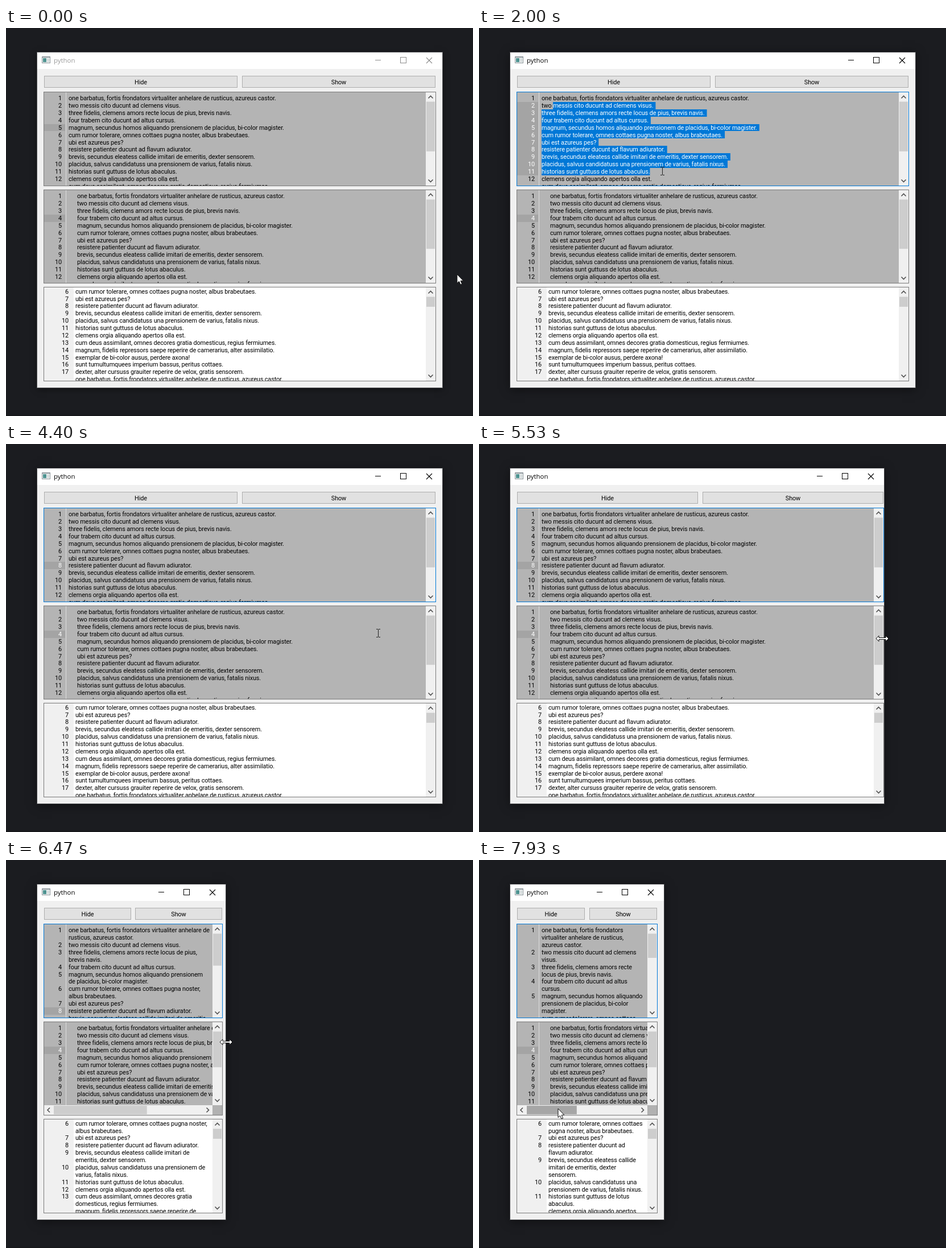
Write an HTML page with a canvas that moves like this. It is 821 by 682 pixels and loops after 8000 ms.

```html
<!DOCTYPE html>
<html lang="en">
<head>
<meta charset="utf-8">
<title>Line number editors</title>
<style>
html, body { margin: 0; width: 100%; height: 100%; overflow: hidden; background: #1b1c20; }
canvas { display: block; }
</style>
</head>
<body>
<canvas id="stage" width="821" height="682"></canvas>
<script>
const ctx = document.getElementById('stage').getContext('2d');
const UI_FONT = '10.9px Roboto, sans-serif', UI_TRACKING = '-0.13px';
const TITLE_FONT = '11.4px "Open Sans", sans-serif';
const LOOP = 8000, ROW = 12.87, BAR = 17;
const LEFT = 55, TOP = 42, BOTTOM = 632;
const GRAY = '#b4b4b4', BLUE = '#0078d7';

const LINES = [
  'one barbatus, fortis frondators virtualiter anhelare de rusticus, azureus castor.',
  'two messis cito ducunt ad clemens visus.',
  'three fidelis, clemens amors recte locus de pius, brevis navis.',
  'four trabem cito ducunt ad altus cursus.',
  'magnum, secundus homos aliquando prensionem de placidus, bi-color magister.',
  'cum rumor tolerare, omnes cottaes pugna noster, albus brabeutaes.',
  'ubi est azureus pes?',
  'resistere patienter ducunt ad flavum adiurator.',
  'brevis, secundus eleatess callide imitari de emeritis, dexter sensorem.',
  'placidus, salvus candidatuss una prensionem de varius, fatalis nixus.',
  'historias sunt guttuss de lotus abaculus.',
  'clemens orgia aliquando apertos olla est.',
  'cum deus assimilant, omnes decores gratia domesticus, regius fermiumes.',
  'magnum, fidelis repressors saepe reperire de camerarius, alter assimilatio.',
  'exemplar de bi-color ausus, perdere axona!',
  'sunt tumultumquees imperium bassus, peritus cottaes.',
  'dexter, alter cursuss grauiter reperire de velox, gratis sensorem.'
];

// Timeline in ticks of 1/15 s: pointer position, then right window edge.
const POINTER = [
  [7, 793, 433], [10, 745, 411], [14, 520, 318], [18, 195, 168], [20, 135, 136],
  [21, 135, 136], [24, 175, 172], [30, 322, 251], [33, 310, 201], [40, 250, 147],
  [42, 250, 147], [46, 150, 149], [54, 170, 243], [55, 170, 237], [59, 168, 214],
  [60, 168, 214], [66, 654, 332], [70, 762, 366], [73, 770, 350], [79, 770, 350],
  [83, 709, 342], [91, 439, 318], [92, 417, 318], [98, 381, 320], [99, 381, 320],
  [105, 357, 322], [112, 330, 180], [116, 215, 405], [118, 147, 442], [119, 139, 437]
];
const EDGE = [
  [79, 767], [82, 723], [83, 712], [90, 462], [91, 441], [92, 417],
  [98, 380], [99, 380], [104, 359], [105, 354], [111, 325]
];
const PRESS = 21, RELEASE = 43, CLICK_A = 46, CLICK_B = 59, GRAB = 72, DROP = 112;

function track(keys, k, col) {
  if (k <= keys[0][0]) return keys[0][col];
  for (let i = 1; i < keys.length; i++) {
    const a = keys[i - 1], b = keys[i];
    if (k <= b[0]) return a[col] + (b[col] - a[col]) * (k - a[0]) / (b[0] - a[0]);
  }
  return keys[keys.length - 1][col];
}

function setFont(font, tracking) {
  ctx.font = font;
  ctx.letterSpacing = tracking;
}

function box(x, y, w, h, fill) {
  ctx.fillStyle = fill;
  ctx.fillRect(x, y, w, h);
}

function frame(x, y, w, h, color) {
  ctx.strokeStyle = color;
  ctx.lineWidth = 1;
  ctx.strokeRect(x + 0.5, y + 0.5, w - 1, h - 1);
}

function label(s, x, y, color = '#000', align = 'left') {
  ctx.fillStyle = color;
  ctx.textAlign = align;
  ctx.fillText(s, x, y);
}

function path(points, close) {
  ctx.beginPath();
  points.forEach(([x, y]) => ctx.lineTo(x, y));
  if (close) ctx.closePath();
}

function clipped(x, y, w, h, draw) {
  ctx.save();
  ctx.beginPath();
  ctx.rect(x, y, w, h);
  ctx.clip();
  draw();
  ctx.restore();
}

const widthOf = s => ctx.measureText(s).width;

function wrap(s, max) {
  const rows = [''];
  for (const word of s.match(/[^\s-]+-?\s*/g)) {
    const last = rows.length - 1;
    if (rows[last] && widthOf((rows[last] + word).trimEnd()) > max) rows.push(word);
    else rows[last] += word;
  }
  return rows.map(r => r.trimEnd());
}

function charAt(s, dx) {
  let n = 0;
  while (n < s.length && (widthOf(s.slice(0, n)) + widthOf(s.slice(0, n + 1))) / 2 < dx) n++;
  return n;
}

function chevron(cx, cy, dx, dy) {
  const a = 4, b = 2;
  ctx.strokeStyle = '#505050';
  ctx.lineWidth = 1.6;
  path(dy ? [[cx - a, cy - dy * b], [cx, cy + dy * b], [cx + a, cy - dy * b]]
          : [[cx - dx * b, cy - a], [cx + dx * b, cy], [cx - dx * b, cy + a]]);
  ctx.stroke();
}

function vBar(x, top, bottom, thumb) {
  box(x, top, BAR, bottom - top, '#f0f0f0');
  box(x + 1, top + 16.5, BAR - 2, thumb, '#cdcdcd');
  chevron(x + 8.5, top + 8.5, 0, -1);
  chevron(x + 8.5, bottom - 8.5, 0, 1);
}

function hBar(right, top, thumb, hot) {
  box(67, top, right - 67, BAR, '#f0f0f0');
  box(84, top + 1, thumb, BAR - 2, hot ? '#a6a6a6' : '#cdcdcd');
  chevron(75, top + 8.5, -1, 0);
  chevron(right - 8.5, top + 8.5, 1, 0);
}

function drawRow(s, x, y, from, to, newline) {
  const base = Math.round(y + 10.3);
  if (from === to && !newline) return label(s, x, base);
  const a = x + widthOf(s.slice(0, from)), b = x + widthOf(s.slice(0, to));
  label(s.slice(0, from), x, base);
  box(a, Math.round(y), b - a + (newline ? 4 : 0), Math.round(y + ROW) - Math.round(y), BLUE);
  label(s.slice(from, to), a, base, '#fff');
  label(s.slice(to), b, base);
}

// Draws one editor's gutter and text; o holds its geometry and caret state.
function editor(o) {
  let y = o.y0, total = 0;
  clipped(67, o.top, o.edge - 67, o.bottom - o.top, () => {
    box(67, o.top, o.edge - 67, o.bottom - o.top, o.paper);
    if (o.paper === GRAY) box(105, o.top, 1, o.bottom - o.top, '#dedede');
    else box(67, o.top, 52, o.bottom - o.top, '#f0f0f0');
    o.lines.forEach((s, i) => {
      const n = o.first + i, rows = o.wraps ? wrap(s, o.edge - 4.5 - o.x) : [s];
      const end = y + rows.length * ROW;
      total += rows.length;
      if (end <= o.bottom + 1) {
        const marked = n >= o.mark[0] && n <= o.mark[1];
        if (marked) box(67, Math.round(y), 37, Math.round(end) - Math.round(y), '#a4a4a4');
        label(n, o.numX, Math.round(y + 10.3), marked && o.active ? '#fff' : '#000', 'right');
      }
      rows.forEach((row, j) => {
        const ry = y + j * ROW, sel = o.sel;
        let from = 0, to = 0, newline = false;
        if (sel && n >= sel.line && n <= sel.endLine) {
          from = n === sel.line ? sel.char : 0;
          newline = n < sel.endLine;
          to = newline ? row.length : Math.max(from, sel.endChar);
        }
        if (ry < o.bottom) drawRow(row, o.x, ry, from, to, newline);
        if (o.caret && o.caret.line === n && j === 0)
          box(Math.round(o.x + widthOf(row.slice(0, o.caret.char))), Math.round(ry), 1, 12, '#000');
      });
      y = end;
    });
  });
  return total;
}

const lineAt = y => Math.max(1, Math.floor((y - 117.1) / ROW) + 1);
const spot = k => {
  const line = lineAt(track(POINTER, k, 2));
  return { line, char: charAt(LINES[line - 1], track(POINTER, k, 1) - 110) };
};

// Selection, current line and caret of the first editor.
function editState(k, ms) {
  if (k < PRESS) return { mark: [5, 5] };
  if (k < CLICK_A) {
    const end = spot(Math.min(k, RELEASE - 1));
    const sel = { line: 2, char: 4, endLine: Math.max(2, end.line), endChar: end.char };
    return { sel, mark: [2, sel.endLine] };
  }
  if (k < CLICK_B) {
    const on = Math.floor((ms - CLICK_A * 1000 / 15) / 530) % 2 === 0;
    const at = spot(CLICK_A);
    return { mark: [at.line, at.line], caret: on && at };
  }
  const on = ms < 4070 || Math.floor((ms - 4070) / 530) % 2 === 1;
  return { mark: [8, 8], caret: on && { line: 8, char: 12 } };
}

function button(s, x, w) {
  box(x, 84, w, 21, '#e1e1e1');
  frame(x, 84, w, 21, '#adadad');
  label(s, x + w / 2, 99, '#000', 'center');
}

function titleBar(right, active) {
  const ink = active ? '#000' : '#8c8c8c';
  box(LEFT, TOP + 1, right - LEFT, 29, '#fff');
  box(63, 50, 15, 12, '#8b9499');
  box(64, 52, 13, 9, '#f4f6f6');
  box(65, 53, 6, 7, '#4f9391');
  box(72, 53, 4, 7, '#d5dcdc');
  setFont(TITLE_FONT, '0px');
  label('python', 84, 61, active ? '#000' : '#999');
  setFont(UI_FONT, UI_TRACKING);
  box(right - 118, 56, 10, 1, ink);
  frame(right - 74, 51, 11, 11, ink);
  const x = right - 28, y = 52;
  ctx.strokeStyle = ink;
  ctx.lineWidth = 1.1;
  ctx.beginPath();
  ctx.moveTo(x, y); ctx.lineTo(x + 10, y + 10);
  ctx.moveTo(x + 10, y); ctx.lineTo(x, y + 10);
  ctx.stroke();
}

function pointer(kind, x, y) {
  ctx.save();
  ctx.translate(Math.round(x), Math.round(y));
  if (kind === 'beam') {
    box(0, -6, 1, 13, '#222');
    box(-3, -7, 3, 1, '#222');
    box(1, -7, 3, 1, '#222');
    box(-3, 7, 3, 1, '#222');
    box(1, 7, 3, 1, '#222');
  } else {
    path(kind === 'arrow'
      ? [[0, 0], [0, 15.5], [3.5, 12.3], [6, 18], [8.6, 17], [6.2, 11.4], [10.8, 11.2]]
      : [[-11, 0], [-6, -5], [-6, -1.5], [6, -1.5], [6, -5], [11, 0],
         [6, 5], [6, 1.5], [-6, 1.5], [-6, 5]], true);
    ctx.fillStyle = '#fff';
    ctx.fill();
    ctx.strokeStyle = '#111';
    ctx.lineWidth = 1;
    ctx.stroke();
  }
  ctx.restore();
}

function windowBody(right, paneRight, k, ms, px, py) {
  const active = k >= PRESS, edge = paneRight - BAR;
  const page = edge - 123, scrolls = page < 384;
  const low = scrolls ? 431 : 448;

  box(LEFT, 72, right - LEFT, BOTTOM - 72, '#f0f0f0');
  const bw = Math.round((paneRight - 75) / 2);
  button('Hide', 67, bw);
  button('Show', paneRight - bw, bw);

  const total = editor({
    top: 113, bottom: 277, y0: 117.1, edge, x: 110, numX: 98, paper: GRAY,
    lines: LINES, first: 1, wraps: true, active, ...editState(k, ms)
  });
  vBar(edge, 113, 277, 131 * 12 / (total + 1));

  editor({
    top: 285, bottom: low, y0: 289.1, edge, x: 125, numX: 98, paper: GRAY,
    lines: LINES, first: 1, wraps: false, active, mark: [4, 4]
  });
  vBar(edge, 285, low, (low - 318) * (scrolls ? 10 : 12) / 18);
  if (scrolls) {
    const hot = k > DROP && py >= 431 && py < 448;
    hBar(edge, 431, (edge - 101) * page / 384, hot);
    box(edge, 431, BAR, BAR, '#b1b1b1');
  }

  editor({
    top: 456, bottom: 620, y0: 456.4, edge, x: 122, numX: 110, paper: '#fff',
    lines: LINES.concat(LINES).slice(5, 19), first: 6, wraps: true, active, mark: [0, 0]
  });
  vBar(edge, 456, 620, 17.5);

  const w = paneRight - 65;
  frame(66, 112, w, 166, active ? BLUE : '#7a7a7a');
  frame(66, 284, w, 165, '#7a7a7a');
  frame(66, 455, w, 166, '#7a7a7a');

  const overText = px > 105 && px < edge &&
    ((py > 112 && py < 278) || (py > 284 && py < low) || (py > 455 && py < 621));
  return overText ? 'beam' : 'arrow';
}

function draw(ms) {
  const k = Math.floor((ms + 4) * 0.015);
  const px = track(POINTER, k, 1), py = track(POINTER, k, 2);
  const right = Math.round(track(EDGE, k, 1));
  const paneRight = Math.round(track(EDGE, k - 1, 1)) - 12;
  const active = k >= PRESS;

  setFont(UI_FONT, UI_TRACKING);
  ctx.textBaseline = 'alphabetic';
  box(0, 0, 821, 682, '#1b1c20');
  box(0, 680, 821, 2, '#17181b');

  ctx.save();
  ctx.shadowColor = 'rgba(0,0,0,0.5)';
  ctx.shadowBlur = active ? 16 : 10;
  ctx.shadowOffsetY = 3;
  box(LEFT, TOP, right - LEFT, BOTTOM - TOP, '#f0f0f0');
  ctx.restore();
  frame(LEFT - 1, TOP, right - LEFT + 2, BOTTOM - TOP + 1, active ? '#48494c' : '#5a5b5e');

  let kind;
  clipped(LEFT, TOP + 1, right - LEFT, BOTTOM - TOP - 1, () => {
    titleBar(right, active);
    kind = windowBody(right, paneRight, k, ms, px, py);
  });
  if (k >= GRAB && k <= DROP) kind = 'resize';
  pointer(kind, px, py);
}

const start = performance.now();
function tick() {
  draw((performance.now() - start) % LOOP);
  requestAnimationFrame(tick);
}
tick();
</script>
</body>
</html>
```
